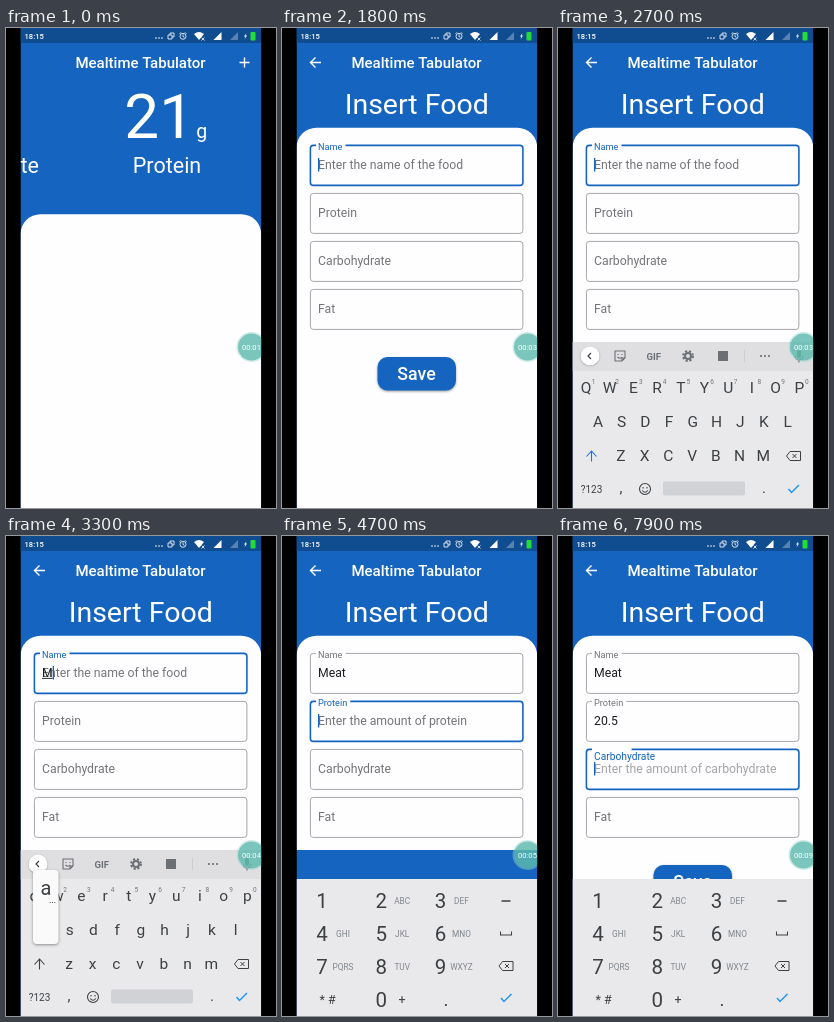
These frames come from a looping animation (270 px wide and 480 px high, 8000 ms). An HTML page with a canvas:

```html
<!DOCTYPE html>
<html lang="en">
<head>
<meta charset="utf-8">
<style>
html, body { margin: 0; width: 100%; height: 100%; overflow: hidden; background: #000; }
canvas { display: block; width: 270px; height: 480px; }
</style>
</head>
<body>
<canvas id="stage"></canvas>
<script>
const LOOP = 8000, LEFT = 14.5, WIDTH = 240.7;
const BLUE = '#1565c0', PAPER = '#fefdff', KEYS = '#e9e9ec', STRIP = '#dfdfe2';
const INK = '#3c4043', GREY = '#757575', TOOL = '#6c7075';
const canvas = document.getElementById('stage');
const ctx = canvas.getContext('2d');
const ratio = window.devicePixelRatio || 1;
canvas.width = 270 * ratio;
canvas.height = 480 * ratio;

const clamp = v => Math.max(0, Math.min(1, v));
const ramp = (t, start, length) => clamp((t - start) / length);
const within = (t, a, b) => t >= a && t < b;
const smooth = u => 1 - (1 - u) ** 3 * (1 + 2 * u * (1 - u));

function text(str, x, y, size, color = '#fff', align = 'center', weight = 400) {
  ctx.font = `${weight} ${size}px Roboto, sans-serif`;
  ctx.textAlign = align;
  ctx.fillStyle = color;
  ctx.fillText(str, x, y);
  return ctx.measureText(str).width;
}
function rect(x, y, w, h, color) {
  ctx.fillStyle = color;
  ctx.fillRect(x, y, w, h);
}
function band(y, h, color) {
  rect(LEFT, y, WIDTH, h, color);
}
function round(x, y, w, h, r, color) {
  ctx.beginPath();
  ctx.roundRect(x, y, w, h, r);
  ctx.fillStyle = color;
  ctx.fill();
}
function disc(x, y, r, color) {
  ctx.beginPath();
  ctx.arc(x, y, r, 0, 7);
  ctx.fillStyle = color;
  ctx.fill();
}
function shadowed(blur, dy, draw) {
  ctx.save();
  ctx.shadowColor = 'rgba(0,0,0,.4)';
  ctx.shadowBlur = blur * ratio;
  ctx.shadowOffsetY = dy * ratio;
  draw();
  ctx.restore();
}
// Path drawn around its own centre
function icon(d, x, y, color = INK, width = 1, filled = false) {
  ctx.save();
  ctx.translate(x, y);
  const path = new Path2D(d);
  ctx.fillStyle = ctx.strokeStyle = color;
  ctx.lineWidth = width;
  filled ? ctx.fill(path) : ctx.stroke(path);
  ctx.restore();
}
function dots(x, y, gap, r, color) {
  for (const i of [-1, 0, 1]) disc(x + i * gap, y, r, color);
}

const CHECK = 'M-5 0L-2 3.5L5.5 -4';
const BACKSPACE = 'M-7 0L-3.5 -4.5H7V4.5H-3.5ZM-1 -2L3 2M3 -2L-1 2';
const SIGNAL = 'M-4 4L4 -4V4Z';

function statusBar() {
  band(0, 15, '#104c90');
  text('18:15', 18.5, 10.8, 7.6, '#fff', 'left', 500);
  dots(153, 10, 3, .8, '#fff');
  icon('M-3 -1H1V3H-3ZM-1 -1V-3H3V1H1', 165, 8, '#fff', .8);
  icon('M3 0A3 3 0 1 1 -3 0A3 3 0 1 1 3 0M0 -2V.3L1.5 1M-3.5 -2.5L-2 -4M3.5 -2.5L2 -4', 177, 8.3, '#fff', .8);
  icon('M-5 -2Q0 -6 5 -2L0 4Z', 193, 8, '#fff', 1, true);
  icon('M2.5 1.5L5.5 4.5M5.5 1.5L2.5 4.5', 193, 8, '#fff', .8);
  icon(SIGNAL, 211.5, 8, '#fff', 1, true);
  icon(SIGNAL, 228, 8, 'rgba(255,255,255,.3)', 1, true);
  icon('M1 -3L-1.5 .6H0L-1 3.5L1.5 -.6H0Z', 239.5, 8, '#fff', 1, true);
  round(244.5, 4, 5, 8.5, 1, '#22dd35');
}

function home(t) {
  const x = 135 + 26 * Math.exp(-t / 110) * (1 - ramp(t, 0, 480));
  band(0, 480, BLUE);
  text('Mealtime Tabulator', 134.5, 39.7, 15, '#fff', 'center', 500);
  icon('M-5 0H5M0 -5V5', 238.5, 34.5, '#fff', 1.4);
  text('21', x - 7.5, 109.7, 62);
  text('g', x + 35, 110.3, 19.5);
  text('Protein', x + .3, 145.3, 21.5);
  text('Carbohydrate', x - 192, 145.3, 21.5);
  round(LEFT, 186.2, WIDTH, 320, 20, PAPER);
}

const fields = [
  { label: 'Name', hint: 'Enter the name of the food', start: 1300, end: 4400,
    typed: [[3250, 'M'], [3450, 'Me'], [3550, 'Mea'], [3750, 'Meat']], composing: true },
  { label: 'Protein', hint: 'Enter the amount of protein', start: 4400, end: 7820,
    typed: [[5700, '2'], [6100, '20'], [7800, '20.5']] },
  { label: 'Carbohydrate', hint: 'Enter the amount of carbohydrate', start: 7825, end: 9999, typed: [] },
  { label: 'Fat', hint: '', start: 9999, end: 9999, typed: [] }
];
const cursorGaps = [[4200, 4400], [5100, 5600], [6500, 7000], [7450, 7820]];

function drawField(f, top, t) {
  const focused = within(t, f.start, f.end);
  const lift = smooth(ramp(t, f.start, 200));
  const value = f.typed.reduce((s, [at, v]) => t >= at ? v : s, '');
  const base = top + 23.5;

  ctx.beginPath();
  ctx.roundRect(28.4, top + .4, 212.5, 40, 3);
  ctx.strokeStyle = focused ? BLUE : '#a6a6a6';
  ctx.lineWidth = focused ? 1.6 : 1;
  ctx.stroke();

  const size = 12.25 - 3.05 * lift;
  ctx.font = '9.2px Roboto, sans-serif';
  if (lift > 0) rect(34, top - 1, (ctx.measureText(f.label).width + 3) * lift + 2, 3, PAPER);

  const hintAlpha = lift * (f.typed.length ? 1 - ramp(t, f.typed[0][0] + 50, 150) : 1);
  if (hintAlpha > 0) {
    ctx.save();
    ctx.globalAlpha *= hintAlpha;
    text(f.hint, 36, base, 12.25, GREY, 'left');
    ctx.restore();
  }
  text(f.label, 36, base - lift * 19, size, focused ? BLUE : GREY, 'left');

  const width = text(value, 36, base, 12.25, '#1c1c1c', 'left');
  if (!focused) return;
  if (f.composing && value) rect(36, base + 1.4, width, .9, '#1c1c1c');
  if (lift > .4 && !cursorGaps.some(([a, b]) => within(t, a, b)))
    rect(36 + width, top + 13, 1.3, 13.5, BLUE);
}

function insertPage(t) {
  band(0, 480, BLUE);
  icon('M5.5 0H-5M0 -5L-5 0L0 5', 33.5, 34.5, '#fff', 1.4);
  text('Mealtime Tabulator', 134.5, 39.7, 15, '#fff', 'center', 500);
  text('Insert Food', 134.7, 86, 28.5);

  ctx.save();
  ctx.beginPath();
  ctx.rect(LEFT, 90, WIDTH, (within(t, 2000, 4800) ? 314 : 480) - 90);
  ctx.clip();
  round(LEFT, 99.7, WIDTH, 420, 20, PAPER);
  fields.forEach((f, i) => drawField(f, 117 + 48 * i, t));
  shadowed(2.5, 1, () => round(95.5, 329, 78.5, 33.5, 10, BLUE));
  text('Save', 134.5, 352, 17.7, '#fff', 'center', 500);
  ctx.restore();
}

const rows = [['qwertyuiop', 28, 360], ['asdfghjkl', 40, 394], ['zxcvbnm', 63, 428]];
const presses = [['m', 3000, 3130], ['e', 3130, 3250], ['a', 3280, 3420], ['t', 3600, 3740]];

function letterKeyboard(t) {
  const upper = within(t, 2650, 3120);
  band(314, 200, KEYS);
  band(314, 29, STRIP);
  shadowed(1.5, .5, () => disc(32, 328, 9.5, '#fff'));
  icon('M1.5 -3L-1.5 0L1.5 3', 31.5, 328, INK, 1.2);
  icon('M-5 -5H5V2L2 5H-5ZM2 5V2H5M-2 -2V-1M2 -2V-1M-2.5 1Q0 3.5 2 1', 62, 328, TOOL, 1.1);
  text('GIF', 95.7, 331.5, 9.5, TOOL, 'center', 700);
  ctx.setLineDash([2.2, 1.7]);
  icon('M4.9 0A4.9 4.9 0 1 1 -4.9 0A4.9 4.9 0 1 1 4.9 0', 130, 328, TOOL, 2);
  ctx.setLineDash([]);
  icon('M3 0A3 3 0 1 1 -3 0A3 3 0 1 1 3 0', 130, 328, TOOL, 2);
  rect(160, 323, 10, 10, TOOL);
  rect(186, 322, .8, 12, '#c8c9cc');
  dots(207, 328, 4, 1.1, TOOL);
  round(239, 322, 4, 8, 2, TOOL);
  icon('M-4 0A4 4 0 0 0 4 0M0 4V6.5', 241, 328, TOOL, 1.1);

  for (const [letters, x0, y] of rows) {
    [...letters].forEach((c, i) => {
      const x = x0 + 23.7 * i;
      text(upper ? c.toUpperCase() : c, x, y + 5, 15.5, INK);
      if (y === 360) text((i + 1) % 10, x + 7.5, y - 4.5, 6.5, '#70757a');
    });
  }
  icon('M0 5.5V-4.5M-5 .5L0 -5L5 .5', 33.5, 428, upper ? '#1a73e8' : INK, 1.1);
  icon(BACKSPACE, 235.5, 428, INK, 1);
  text('?123', 33.5, 464.5, 10, INK);
  text(',', 63, 465, 15, INK);
  icon('M5.5 0A5.5 5.5 0 1 1 -5.5 0A5.5 5.5 0 1 1 5.5 0M-2 -2V-.5M2 -2V-.5M-2.8 1.5Q0 5 2.8 1.5', 87, 461, INK, 1.1);
  round(105, 453.5, 82, 14, 2, '#d0d2d6');
  text('.', 206, 465, 15, INK);
  icon(CHECK, 235.5, 461, '#2196f3', 1.5);

  const press = presses.find(([, a, b]) => within(t, a, b));
  if (!press) return;
  const [letters, x0, y] = rows.find(r => r[0].includes(press[0]));
  const x = x0 + 23.7 * letters.indexOf(press[0]);
  shadowed(3, 1, () => round(x - 13, y - 60, 25.5, 74, 4, '#fafafa'));
  text(upper ? press[0].toUpperCase() : press[0], x, y - 35, 20, INK);
  dots(x + 6.5, y - 27.5, 2.3, .6, INK);
}

const pad = ['1', '2ABC', '3DEF', '4GHI', '5JKL', '6MNO', '7PQRS', '8TUV', '9WXYZ'];

function numberKeyboard(t) {
  band(343, 137, KEYS);
  for (const [y, at] of [[365, 5600], [464, 6000]])
    if (within(t, at, at + 330)) disc(105, y, 17, `rgba(0,0,0,${.1 * (1 - ramp(t, at, 330))})`);
  pad.forEach((key, i) => {
    const x = 40 + 59.2 * (i % 3), y = 372 + 33 * Math.floor(i / 3);
    text(key[0], x, y, 20.5, INK);
    text(key.slice(1), x + 21, y - 4.5, 8.3, '#80868b');
  });
  text('* #', 45.5, 468, 12.5, INK);
  text('0', 99.2, 471, 20.5, INK);
  text('+', 120, 468, 12.5, INK);
  text('.', 164, 470, 19, INK);
  icon('M-4.5 0H4.5', 224, 365, INK, 1.5);
  icon('M-5.5 -2V1.5H5.5V-2', 224, 397.5, INK, 1.1);
  icon(BACKSPACE, 224, 430, INK, 1);
  icon(CHECK, 224, 462, '#2196f3', 1.5);
}

function recorderBubble(t) {
  disc(245.5, 319, 15, 'rgba(150,212,204,.45)');
  disc(245.5, 319, 13.5, 'rgba(80,180,168,.66)');
  text('00:0' + (1 + Math.floor((t + 200) / 1000)), 236, 321.8, 7.6, '#fff', 'left');
}

function draw(t) {
  ctx.setTransform(ratio, 0, 0, ratio, 0, 0);
  rect(0, 0, 270, 480, '#000');
  ctx.save();
  ctx.beginPath();
  ctx.rect(LEFT, 0, WIDTH, 480);
  ctx.clip();

  const shown = ramp(t, 540, 120);
  if (shown < 1) home(t);
  if (shown > 0) {
    ctx.globalAlpha = shown;
    insertPage(t);
    ctx.globalAlpha = 1;
  }
  statusBar();

  if (within(t, 2100, 4500)) {
    ctx.save();
    ctx.translate(0, 167 * (1 - ramp(t, 2100, 300)) ** 3.5);
    letterKeyboard(t);
    ctx.restore();
  } else if (t >= 4500) numberKeyboard(t);

  recorderBubble(t);
  ctx.restore();
}

function tick() {
  draw(performance.now() % LOOP);
  requestAnimationFrame(tick);
}
tick();
</script>
</body>
</html>
```
